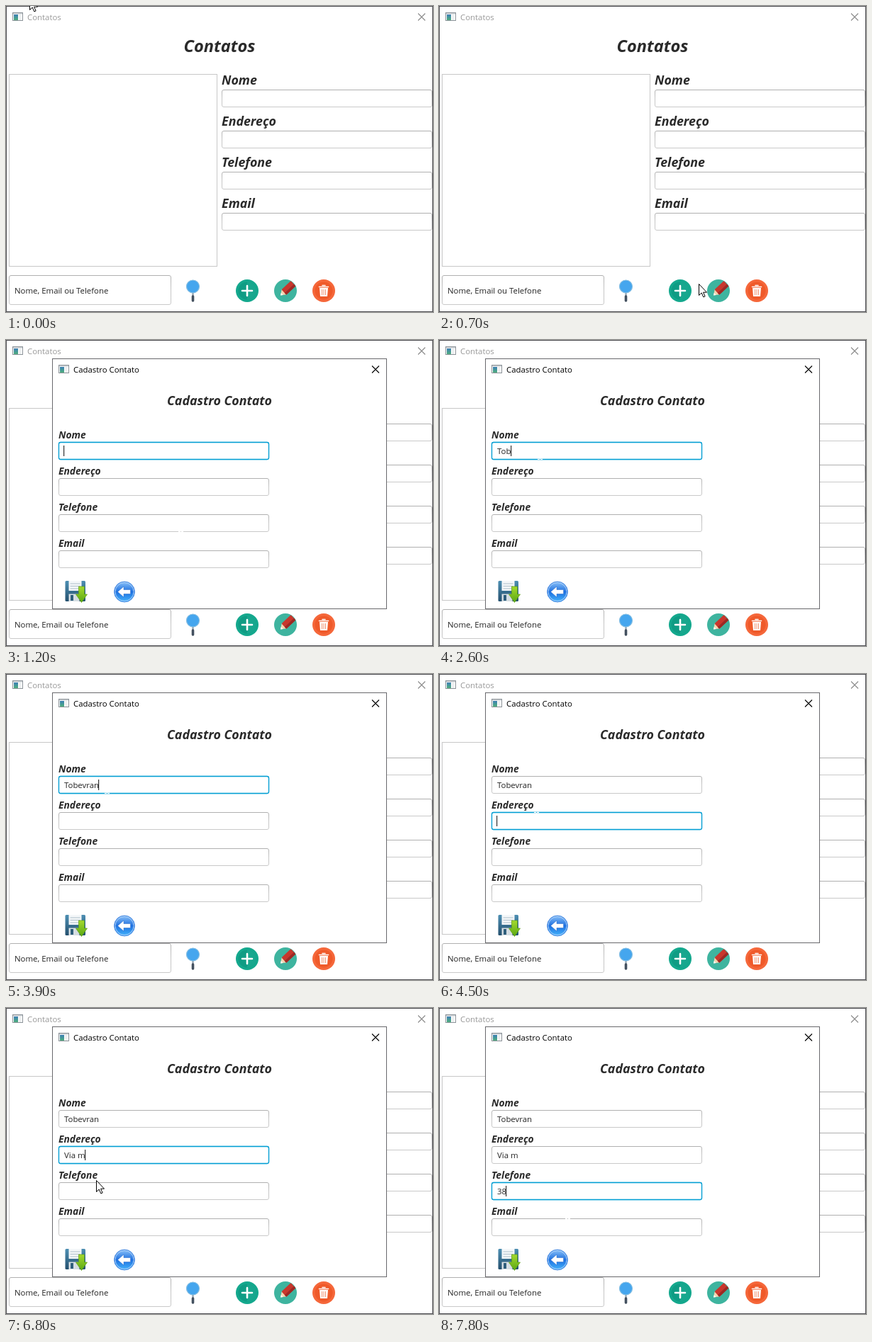
An HTML page for the animation above (8000 ms loop, 602 by 432 pixels).

```html
<!DOCTYPE html>
<html lang="pt">
<head>
<meta charset="utf-8">
<title>Contatos</title>
<style>
html, body { margin: 0; width: 100%; height: 100%; overflow: hidden; background: #fff; }
svg { display: block; width: 602px; height: 432px; }
text { font-family: "Open Sans", "Noto Sans", sans-serif; fill: #222; white-space: pre; }
.bold { font-weight: 700; font-style: italic; fill: #2a2a2a; }
.mid { text-anchor: middle; }
.dark { fill: #000; stroke: #000; }
text.dark { stroke: none; }
.dim { fill: #999; stroke: #8c8c8c; }
text.dim { stroke: none; }
.field { fill: #fff; stroke: url(#edge); }
.field.focus { stroke: #039ed3; stroke-width: 1.3; filter: drop-shadow(0 0 .5px #039ed399); }
</style>
</head>
<body>
<svg viewBox="0 0 602 432" xmlns="http://www.w3.org/2000/svg">
  <defs id="defs"></defs>
  <g id="main"></g>
  <g id="dialog"></g>
  <g id="pointer">
    <path id="arrow" d="M.5.5V16.500l3.700-3.500 2.600 5.900 2.300-1-2.500-5.700H11.500Z" fill="#fff" stroke="#000"/>
    <path id="hand" d="M-2 12V2a2 2 0 0 1 4 0V8q3-1 3.500 1 3-.5 3.500 1 2.500 0 2.500 2V16q0 3-2 5v1.500H0q-1-3-4-6l-2.500-4q0-2 2-1.500zM2 8v4M5.500 9v3.500M9 10v3" fill="#fff" stroke="#000"/>
    <path id="beam" d="M-3-7.500h3M1-7.500h3M.5-7V8M-3 8.500h3M1 8.500h3" fill="none" stroke="#fff"/>
  </g>
</svg>
<script>
const LOOP = 8000, TICK = 100, ACTIVE = 1100, OPEN = 1200, BLINK = 500;
const FIELD = { x: 74, y: 144, w: 297, h: 25, gap: 51 };
const $ = id => document.getElementById(id);

// Each field takes focus, then gains one letter per step.
const FIELDS = [
  { label: "Nome", value: "Tobevran", focus: OPEN, from: 2200, step: 180 },
  { label: "Endereço", value: "Via m", focus: 4500, from: 5100, step: 175 },
  { label: "Telefone", value: "38", focus: 7300, from: 7500, step: 200 },
  { label: "Email", value: "", focus: Infinity }
];

// Pointer moves, each eased from where the last one ended.
const HOME = { x: 33, y: -11 };
const MOVES = [
  { from: 100, to: 700, x: 366, y: 392 },
  { from: 700, to: 900, x: 340, y: 396 },
  { from: ACTIVE, to: OPEN, x: 246, y: 262 },
  { from: OPEN, to: 1700, x: 142, y: 160 },
  { from: 4000, to: 4100, x: 137, y: 203 },
  { from: 6200, to: 6500, x: 127, y: 243 },
  { from: 6900, to: 7200, x: 140, y: 258 },
  { from: 7400, to: 7800, x: 181, y: 305 }
];

const text = (x, y, size, str, more = "") => `<text x="${x}" y="${y}" font-size="${size}" ${more}>${str}</text>`;
const rect = (x, y, w, h, fill, more = "") => `<rect x="${x}" y="${y}" width="${w}" height="${h}" fill="${fill}" ${more}/>`;
const frameBox = (x, y, w, h, stroke) => rect(x + .5, y + .5, w - 1, h - 1, "#fff", `stroke="${stroke}"`);
const input = (x, y, w, h, id = "") => rect(x + .5, y + .5, w - 1, h - 1, "#fff", `class="field" rx="2.5" id="${id}"`);
const disc = (x, y, r, fill, more = "") => `<circle cx="${x}" cy="${y}" r="${r}" fill="${fill}" ${more}/>`;
const path = (d, fill, more = "") => `<path d="${d}" fill="${fill}" ${more}/>`;
const line = (d, stroke, width) => path(d, "none", `stroke="${stroke}" stroke-width="${width}" stroke-linecap="round"`);
const at = (x, y, art) => `<g transform="translate(${x} ${y})">${art}</g>`;
const repeat = (n, make) => Array.from({ length: n }, (_, i) => make(i)).join("");
const gradient = (id, ...colors) =>
  `<linearGradient id="${id}" x2="0" y2="1">${colors.map((c, i) =>
    `<stop offset="${i / (colors.length - 1)}" stop-color="${c}"/>`).join("")}</linearGradient>`;

$("defs").innerHTML =
  gradient("edge", "#b0b0b0", "#c6c6c6", "#c9c9c9") + gradient("pane", "#3c7fb5", "#4fae7c") +
  gradient("disk", "#4d8fb3", "#24506e") + gradient("leaf", "#a4d92f", "#5aa812") +
  gradient("ball", "#8cc2f8", "#1c6fe0", "#45b5fc");

const appIcon = frameBox(0, 0, 15, 12, "#8b9298") + rect(1, 1, 13, 1.5, "#c9ced2") +
  rect(2, 3, 6, 8, "url(#pane)") + rect(9, 3, 4, 8, "#eef0f1");
const cross = '<path d="M0 0L10 10M10 0L0 10" stroke-width="1.1"/>';
const titleBar = (x, y, right, str, cls) =>
  at(x, y, appIcon) + text(x + 21, y + 11, 11.4, str, `class="${cls}"`) +
  `<g class="${cls}" transform="translate(${right} ${y + 1.5})">${cross}</g>`;

const magnifier = line("M0 9v5", "#9aa7b2", 2.5) + line("M0 14v6", "#43505f", 3.6) +
  disc(0, 0, 9, "#45a6ee", 'stroke="#83bde2" stroke-width="1.2"');
const addIcon = disc(0, 0, 16, "#14a88d") + disc(0, 0, 12.5, "#0f9c84") +
  path("M0-12.500a12.500 12.500 0 0 1 0 25z", "#18a78e") + line("M-7 0h14M0-7v14", "#fff", 2.6);
const editIcon = disc(0, 0, 16, "#3eb49f") +
  `<g transform="rotate(-43) translate(-9.500 0)">${
    path("M0 0L7-5V5Z", "#f3d6b0") + path("M0 0L3-2V2Z", "#fff") +
    rect(6.5, -5, 18, 10, "#c8372d", 'rx="1"') + rect(6.5, 1.5, 18, 3.5, "#9c2a25")}</g>`;
const trashIcon = disc(0, 0, 16, "#f5673a") + disc(0, 0, 12.5, "#ef5a2a") +
  path("M-6-4h12l-1 12H-5z", "#fff") + line("M-6.500-5.500h13M-2-7.500h4", "#fff", 1.6) +
  repeat(3, i => rect(i * 2.5 - 3, -2, 1, 8, "#f0906e"));
const saveIcon = rect(0, 0, 28.5, 29, "url(#disk)", 'rx="1.5"') + rect(5, 0, 18, 14, "#f4f7f9") +
  repeat(3, i => rect(7, 3.5 + i * 3.5, 14, 1, "#aebfca")) +
  rect(5, 18.5, 15, 10.5, "#d5dde2") + rect(7.5, 20, 4, 8, "#2f5f7d") +
  path("M19 8h8v11h4L23 30.500 15 19h4z", "url(#leaf)", 'stroke="#5b9c14" stroke-width=".7"');
const backIcon = disc(0, 0, 14.4, "url(#ball)", 'stroke="#4a8ae0"') + disc(0, 0, 13, "none", 'stroke="#a9d0fa"') +
  path("M-9.500 0l8.500-7.500v4.500h9.500v6H-1v4.500z", "#fff", 'stroke="#2a68c4" stroke-width=".5"');

$("main").innerHTML =
  frameBox(0, 0, 602, 432, "#4c4c50") +
  `<g id="bar"></g>` + text(301, 65, 23.6, "Contatos", 'class="bold mid"') +
  frameBox(4, 96, 294, 272, "#c8c8c8") +
  FIELDS.map((f, i) => at(304, 118 + 58 * i, text(0, -7, 17.8, f.label, 'class="bold"') + input(0, 0, 297, 25))).join("") +
  input(4, 380, 229, 42) + text(12, 406, 11.4, "Nome, Email ou Telefone") +
  at(263.5, 396, magnifier) +
  [addIcon, editIcon, trashIcon].map((icon, i) => at(340 + 54 * i, 402, icon)).join("");

$("dialog").innerHTML =
  frameBox(65, 26, 472, 354, "#68686c") +
  titleBar(74, 35, 516, "Cadastro Contato", "dark") +
  text(301, 92, 17.8, "Cadastro Contato", 'class="bold mid"') +
  FIELDS.map((f, i) => at(FIELD.x, FIELD.y + FIELD.gap * i,
    text(0, -5, 13.8, f.label, 'class="bold"') +
    input(0, 0, FIELD.w, FIELD.h, "field" + i) +
    text(8, 17, 11.4, "", `id="value${i}"`))).join("") +
  rect(0, 0, 1.2, 15, "#333", 'id="caret"') + at(83.5, 340, saveIcon) + at(167, 355.5, backIcon);

const clamp = (v, low, high) => Math.min(high, Math.max(low, v));
const ease = p => p * p * (3 - 2 * p);
const show = (id, on) => { $(id).style.display = on ? "" : "none"; };

function pointerAt(t) {
  let { x, y } = HOME;
  for (const m of MOVES) {
    const p = ease(clamp((t - m.from) / (m.to - m.from), 0, 1));
    x += (m.x - x) * p;
    y += (m.y - y) * p;
  }
  return [Math.round(x), Math.round(y)];
}

function pointerKind(x, y, open) {
  if (!open) return Math.hypot(x - 340, y - 402) < 16 ? "hand" : "arrow";
  const dx = x - FIELD.x, dy = y - FIELD.y;
  const inside = dx >= 0 && dx < FIELD.w && dy >= 0 && dy < FIELD.gap * FIELDS.length;
  return inside && dy % FIELD.gap < FIELD.h ? "beam" : "arrow";
}

function typedCount(field, t) {
  if (!(t >= field.from)) return 0;
  return Math.min(field.value.length, Math.floor((t - field.from) / field.step) + 1);
}

function renderForm(t) {
  FIELDS.forEach((f, i) => { $("value" + i).textContent = f.value.slice(0, typedCount(f, t)); });
  const current = FIELDS.findLastIndex(f => f.focus <= t), field = FIELDS[current];
  FIELDS.forEach((f, i) => $("field" + i).classList.toggle("focus", i === current));

  const count = typedCount(field, t);
  const lastKey = count ? Math.ceil((field.from + (count - 1) * field.step) / TICK) * TICK : field.focus;
  const width = count ? $("value" + current).getComputedTextLength() : 0;
  $("caret").setAttribute("x", Math.round(FIELD.x + 7.4 + width));
  $("caret").setAttribute("y", FIELD.y + 5 + FIELD.gap * current);
  show("caret", (t - lastKey) % (2 * BLINK) < BLINK);
}

function render(time) {
  const t = Math.floor(time % LOOP / TICK) * TICK, open = t >= OPEN;
  $("bar").innerHTML = titleBar(9, 9, 581, "Contatos", t >= ACTIVE && !open ? "dark" : "dim");
  show("dialog", open);
  if (open) renderForm(t);

  const [x, y] = pointerAt(t), kind = pointerKind(x, y, open);
  $("pointer").setAttribute("transform", `translate(${x} ${y})`);
  for (const id of ["arrow", "hand", "beam"]) show(id, id === kind);
}

function frame(now) {
  render(now);
  requestAnimationFrame(frame);
}
render(0);
requestAnimationFrame(frame);
</script>
</body>
</html>
```
